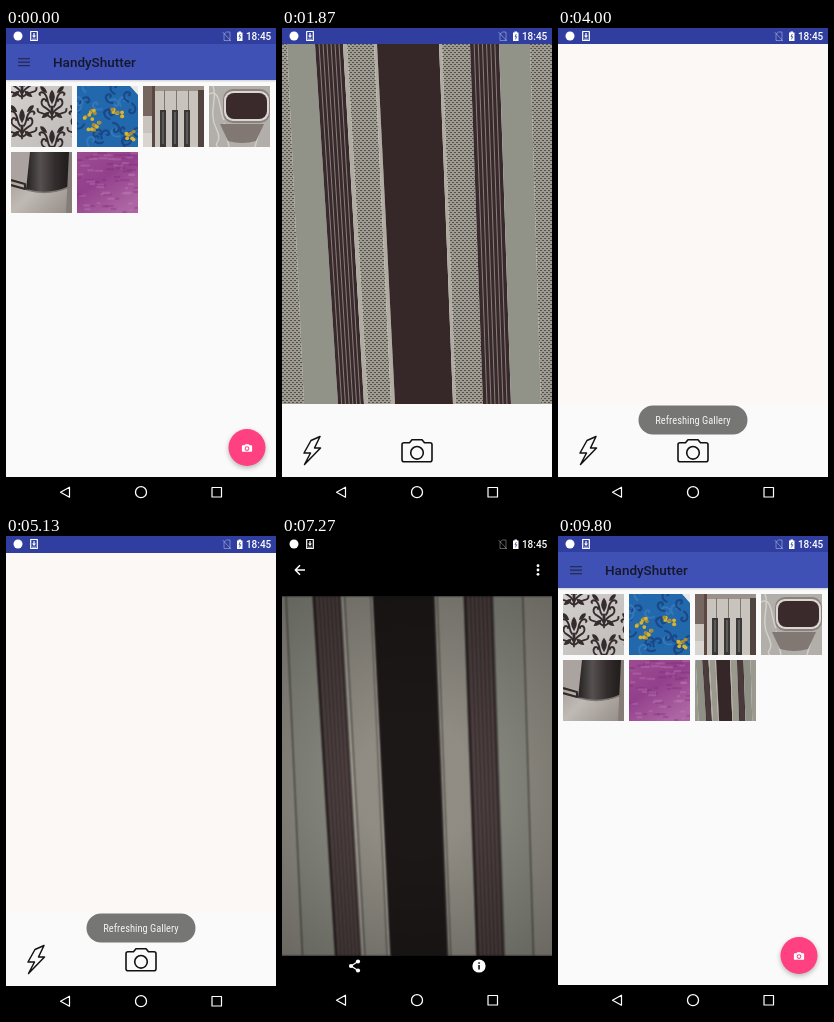
An HTML page with a canvas for the animation above (9870 ms loop, 270x480 px).

```html
<!DOCTYPE html>
<html lang="en">
<head>
<meta charset="utf-8">
<title>Camera app demo</title>
<style>
html, body { margin: 0; width: 100%; height: 100%; overflow: hidden; background: #000; }
canvas { display: block; width: 100vw; height: 100vh; }
</style>
</head>
<body>
<canvas id="stage" width="270" height="480"></canvas>
<script>
const LOOP = 9870, W = 270, H = 480, NAV_TOP = 449;
const OPEN_CAMERA = 1000, CLOSE_CAMERA = 5070, OPEN_VIEWER = 6790, CLOSE_VIEWER = 8880;
const TOAST_IN = 3700, TOAST_OUT = 5700;

const screen = document.getElementById('stage').getContext('2d');
const layerCanvas = Object.assign(document.createElement('canvas'), { width: W, height: H });
const layer = layerCanvas.getContext('2d');
let g = screen;

const clamp = v => Math.max(0, Math.min(1, v));
const ramp = (t, from, to) => clamp((t - from) / (to - from));
const smooth = p => p * p * (3 - 2 * p);
const mix = (a, b, p) => a + (b - a) * p;
const mixColor = (a, b, p) => `rgb(${a.map((v, i) => Math.round(mix(v, b[i], p)))})`;
const noise = n => { const s = Math.sin(n * 127.1 + 3.7) * 43758.5453; return s - Math.floor(s); };

function rect(x, y, w, h, color) { g.fillStyle = color; g.fillRect(x, y, w, h); }
function disc(x, y, r, color) { g.fillStyle = color; g.beginPath(); g.arc(x, y, r, 0, 7); g.fill(); }
function ring(x, y, r, color, width) {
  g.strokeStyle = color; g.lineWidth = width;
  g.beginPath(); g.arc(x, y, r, 0, 7); g.stroke();
}
function rounded(x, y, w, h, r, color) {
  g.fillStyle = color; g.beginPath(); g.roundRect(x, y, w, h, r); g.fill();
}
function fill(d, color) { g.fillStyle = color; g.fill(new Path2D(d)); }
function stroke(d, color, width) { g.strokeStyle = color; g.lineWidth = width; g.stroke(new Path2D(d)); }
function text(s, x, y, font, color, align = 'left') {
  g.font = font; g.fillStyle = color; g.textAlign = align; g.fillText(s, x, y);
}
function at(x, y, draw) { g.save(); g.translate(x, y); draw(); g.restore(); }
function clipTo(x, y, w, h, draw) {
  g.save(); g.beginPath(); g.rect(x, y, w, h); g.clip(); g.translate(x, y); draw(); g.restore();
}
function gradient(x0, y0, x1, y1, ...colors) {
  const grad = g.createLinearGradient(x0, y0, x1, y1);
  colors.forEach((c, i) => grad.addColorStop(i / (colors.length - 1), c));
  return grad;
}

// Striped curtain: kind, left edge at the top, left edge at the bottom
const STRIPS = [
  ['weave', -40, -20], ['plain', 5, 22], ['ribs', 33, 56], ['pale', 61, 82], ['weave', 65, 86],
  ['pale', 92, 109], ['dark', 95, 113], ['pale', 157, 171], ['weave', 160, 174],
  ['ribs', 188, 201], ['plain', 217, 229], ['weave', 248, 259], ['end', 320, 320]
];
const CLOTH = {   // underexposed and normal colours
  weave: [[54, 39, 28], [158, 156, 146]],
  plain: [[48, 36, 24], [145, 146, 136]],
  pale: [[68, 48, 35], [176, 172, 162]],
  dark: [[4, 3, 3], [54, 40, 41]],
  ribs: [[15, 10, 9], [56, 42, 44]]
};
const weaveTile = (() => {
  const c = Object.assign(document.createElement('canvas'), { width: 4, height: 4 });
  const k = c.getContext('2d');
  k.fillStyle = '#302824';
  k.fillRect(0, 0, 2, 1);
  k.fillRect(2, 2, 2, 1);
  return c;
})();

function fabric(light, shift, texture) {
  STRIPS.slice(0, -1).forEach(([kind, top, bottom], i) => {
    const [, nextTop, nextBottom] = STRIPS[i + 1];
    const edge = new Path2D(`M${top + shift} 0H${nextTop + shift}L${nextBottom + shift} 360H${bottom + shift}Z`);
    g.fillStyle = mixColor(...CLOTH[kind], light);
    g.fill(edge);
    if (kind === 'weave' && texture) {
      g.save();
      g.globalAlpha *= texture;
      g.fillStyle = g.createPattern(weaveTile, 'repeat');
      g.fill(edge);
      g.restore();
    }
    if (kind === 'ribs') {
      for (let n = 1; n < 7; n++) {
        const a = mix(top, nextTop, n / 7) + shift, b = mix(bottom, nextBottom, n / 7) + shift;
        stroke(`M${a} 0L${b} 360`, mixColor([62, 40, 32], [138, 126, 122], light), 1);
      }
    }
  });
}

// Thumbnails, each drawn in a 61 px square
function damask() {
  rect(0, 0, 61, 61, gradient(0, 0, 61, 61, '#d3d0cd', '#bebab7'));
  const ink = '#352c2d';
  const motif = () => {
    g.scale(0.8, 0.8);
    fill('M0 -14Q7 -6 0 4Q-7 -6 0 -14Z', ink);
    for (const side of [-1, 1]) {
      g.save();
      g.scale(side, 1);
      stroke('M0 18C4 6 14 10 13 1C12 -4 6 -3 8 1M2 8C7 3 4 -5 10 -10C14 -13 18 -8 14 -7M1 21C10 12 19 18 18 9', ink, 2.4);
      fill('M3 14Q10 13 13 21Q5 22 3 14ZM6 -10Q9 -20 15 -18Q14 -10 6 -10Z', ink);
      g.restore();
    }
    fill('M-2 6H2L1 24H-1Z', ink);
  };
  for (const [x, y] of [[41, 15], [11, -6], [11, 34], [41, 55], [71, 34]]) at(x, y, motif);
}
function floral() {
  rect(0, 0, 61, 61, '#2268ad');
  for (let i = 0; i < 26; i++) {
    at(noise(i) * 61, noise(i + 50) * 61, () => {
      g.rotate(noise(i + 90) * 6);
      stroke('M-6 2C-3 -5 4 -4 4 1C3 4 0 3 1 1', i % 3 ? '#1b4785' : '#3478ba', 2);
    });
  }
  for (const [x, y] of [[41, 27], [17, 41], [52, 50], [12, 29]])
    for (let i = 0; i < 8; i++)
      disc(x + noise(x + i) * 12 - 6, y + noise(y + i * 3) * 9 - 4.5, 1.9, i % 3 ? '#d9b52f' : '#a98b36');
  fill('M53 0H61V9Z', '#e9e9e8');
}
function piano() {
  rect(0, 0, 61, 61, '#c9c3be');
  rect(0, 0, 61, 5, '#9b928c');
  rect(0, 0, 9, 30, '#75665f');
  rect(9, 0, 3, 61, '#5a4741');
  for (const x of [21, 33, 45]) {
    rect(x, 4, 1, 57, '#81766f');
    rect(x - 4, 24, 6, 37, '#3a3737');
    rect(x - 2, 26, 2, 32, '#5d5b5a');
  }
  rect(55, 4, 6, 57, '#51433e');
  rect(0, 47, 9, 14, '#d8d4d0');
}
function cushion() {
  rect(0, 0, 61, 61, '#b2afaa');
  stroke('M0 8C12 2 10 25 15 34M4 0C9 12 -1 26 7 42S3 56 9 61M15 37L20 61M52 38L46 61', '#d2cfc9', 1.5);
  fill('M11 38H55L47 55Q33 59 19 55Z', '#817773');
  rounded(14, 3, 47, 34, 10, '#8b807c');
  rounded(15, 5, 45, 30, 9, '#dad6d2');
  rounded(17, 7, 41, 26, 8, '#3b2a2b');
}
function kettle() {
  rect(0, 0, 61, 61, gradient(0, 0, 61, 61, '#958d88', '#c0bab4', '#938b85'));
  fill('M0 0H20L16 31L0 24Z', '#aaa3a0');
  fill('M19 0H58V35Q40 44 15 38Z', gradient(15, 0, 58, 0, '#242020', '#565150', '#332e2d', '#201c1b'));
  fill('M58 0H61V61H55Z', '#857c77');
  stroke('M0 28L14 32V37L0 33', '#302a29', 2.2);
  stroke('M16 38Q38 44 58 35', '#7d7671', 1.5);
}
function violet() {
  rect(0, 0, 61, 61, gradient(0, 0, 40, 61, '#9d4c93', '#93408c', '#ad65a3'));
  for (let i = 0; i < 70; i++)
    rect(noise(i) * 58, noise(i + 200) * 60, 3 + noise(i + 9) * 7, 2, i % 2 ? 'rgba(205,145,195,.28)' : 'rgba(105,28,105,.25)');
}
function curtain() {
  g.scale(61 / 270, 61 / 270);
  g.translate(0, -45);
  fabric(0.97, -4, 0);
}
const THUMBS = [damask, floral, piano, cushion, kettle, violet, curtain];

const CAMERA_BODY = 'M-13 -8H-7.5L-5 -11H5L7.5 -8H13Q15 -8 15 -6V9Q15 11 13 11H-13Q-15 11 -15 9V-6Q-15 -8 -13 -8Z';

function navBar() {
  rect(0, NAV_TOP, W, H - NAV_TOP, '#000');
  g.lineJoin = 'round';
  stroke('M63.5 459.2V469.2L54.5 464.2Z', '#fff', 1.2);
  ring(135, 464.2, 5.5, '#fff', 1.3);
  stroke('M206 459.5H215.5V469H206Z', '#fff', 1.2);
}

function statusIcons() {
  disc(12, 8, 4.5, '#fff');
  stroke('M24.7 3.5H31.3V12.5H24.7Z', '#fff', 1.2);
  fill('M27.4 5H28.6V7.5H30L28 10L26 7.5H27.4ZM26 10.7H30V11.6H26Z', '#fff');
  stroke('M218 6L220.5 4H224V12.5H218ZM216.5 4L225 13', 'rgba(255,255,255,.4)', 0.9);
  fill('M231 4.5H232.5V3.5H235V4.5H236.5V13H231Z', '#fff');
  stroke('M234.3 6L233 8.7H234.7L233.4 11.4', '#303f9f', 0.8);
  text('18:45', 265.3, 11.7, '500 10px Roboto, sans-serif', '#fff', 'right');
}

function gallery(count) {
  rect(0, 0, W, H, '#fafafa');
  g.save();
  g.shadowColor = 'rgba(0,0,0,.2)'; g.shadowBlur = 2; g.shadowOffsetY = 0.5;
  rect(0, 16, W, 36, '#3f51b5');
  g.restore();
  rect(0, 0, W, 16, '#303f9f');
  for (const y of [30, 33.5, 37]) rect(12, y, 12, 1.3, '#252c58');
  text('HandyShutter', 47, 39, '500 13.5px Roboto, sans-serif', '#15182b');
  THUMBS.slice(0, count).forEach((draw, i) =>
    clipTo(5 + 66 * (i % 4), 58 + 66 * Math.floor(i / 4), 61, 61, draw));
  g.save();
  g.shadowColor = 'rgba(0,0,0,.28)'; g.shadowBlur = 5; g.shadowOffsetY = 2;
  disc(241, 419.5, 18.5, '#ff4081');
  g.restore();
  at(241, 420, () => {
    g.scale(0.34, 0.34);
    fill(CAMERA_BODY, '#fff');
    ring(0, 1.5, 5.5, '#ff4081', 3);
  });
  navBar();
}

function preview(t) {
  const shift = t < 1870 ? mix(-9, 0, smooth(ramp(t, 1070, 1870))) : mix(0, -4, smooth(ramp(t, 1900, 3300)));
  fabric(smooth(ramp(t, 1100, 1700)), shift, 0.65);
  g.save();
  g.globalAlpha = ramp(t, 3400, 3600);
  rect(0, 0, W, 360, '#fcf8f5');
  g.restore();
}

function camera(t) {
  rect(0, 0, W, H, '#fafafa');
  rect(0, 0, W, 16, '#303f9f');
  clipTo(0, 16, W, 360, () => preview(t));
  g.lineJoin = 'round';
  stroke('M38 408.5L29 412.5L22 425H28.5L22.5 436.5L38.5 420H32.5Z', '#111', 1.5);
  at(135, 422.8, () => {
    stroke(CAMERA_BODY, '#111', 1.6);
    ring(0, 2, 6.3, '#111', 1.6);
  });
  navBar();
}

function viewer(t) {
  rect(0, 0, W, H, '#000');
  clipTo(0, 60, W, 360, () => {
    g.save();
    g.filter = `blur(${mix(1, 0.4, ramp(t, 7270, 7500))}px)`;
    g.scale(0.975, 1);
    fabric(0.96, -1, 0.15);
    // The middle band is deeper in the saved photo.
    fill('M94 0H156L170 360H112Z', 'rgba(18,18,18,.6)');
    g.restore();
    const shade = g.createRadialGradient(135, 190, 60, 135, 180, 245);
    shade.addColorStop(0, 'rgba(0,0,0,.04)');
    shade.addColorStop(1, 'rgba(0,0,0,.32)');
    rect(0, 0, W, 360, shade);
  });
  stroke('M23 34H13.5M18 29.3L13.3 34L18 38.7', '#fff', 1.5);
  for (const y of [29.7, 34, 38.3]) disc(256, y, 1.4, '#fff');
  stroke('M76 425.5L69 430L76 434.5', '#fff', 1.3);
  for (const [x, y] of [[76, 425.5], [69, 430], [76, 434.5]]) disc(x, y, 2.1, '#fff');
  disc(197, 430, 6.6, '#fff');
  rect(196.3, 429, 1.5, 4.5, '#000');
  rect(196.3, 426.3, 1.5, 1.5, '#000');
  navBar();
}

// Window slides up while fading in, and slides down while fading out.
function windowPose(t, open, close) {
  if (t < open || t >= close + 250) return null;
  if (t < close) {
    return {
      y: 38 * Math.pow(1 - ramp(t, open, open + 350), 5),
      alpha: 1 - Math.pow(1 - ramp(t, open, open + 200), 4)
    };
  }
  return { y: 38 * Math.pow(ramp(t, close, close + 250), 3), alpha: 1 - ramp(t, close + 100, close + 250) };
}

function showWindow(draw, t, pose) {
  g = layer;
  g.clearRect(0, 0, W, H);
  draw(t);
  g = screen;
  g.save();
  g.globalAlpha = pose.alpha;
  g.drawImage(layerCanvas, 0, Math.round(pose.y));
  g.restore();
}

function toast(t) {
  const alpha = ramp(t, TOAST_IN, TOAST_IN + 300) * (1 - ramp(t, TOAST_OUT, TOAST_OUT + 300));
  if (!alpha) return;
  g.save();
  g.globalAlpha = alpha;
  rounded(80.5, 377.5, 109, 29, 14.5, '#767674');
  text('Refreshing Gallery', 135, 396, '10.5px "Roboto Condensed", Roboto, sans-serif', '#f2f2f2', 'center');
  g.restore();
}

function render(t) {
  const cameraPose = windowPose(t, OPEN_CAMERA, CLOSE_CAMERA);
  const viewerPose = windowPose(t, OPEN_VIEWER, CLOSE_VIEWER);
  gallery(t < CLOSE_CAMERA ? 6 : 7);
  if (cameraPose) {
    showWindow(camera, t, cameraPose);
    // The live preview surface does not fade in with its window.
    if (t < OPEN_CAMERA + 350) clipTo(0, 16 + Math.round(cameraPose.y), W, 360, () => preview(t));
  }
  if (viewerPose) showWindow(viewer, t, viewerPose);
  toast(t);
  statusIcons();
}

const start = performance.now();
function tick() {
  render((performance.now() - start) % LOOP);
  requestAnimationFrame(tick);
}
tick();
</script>
</body>
</html>
```
